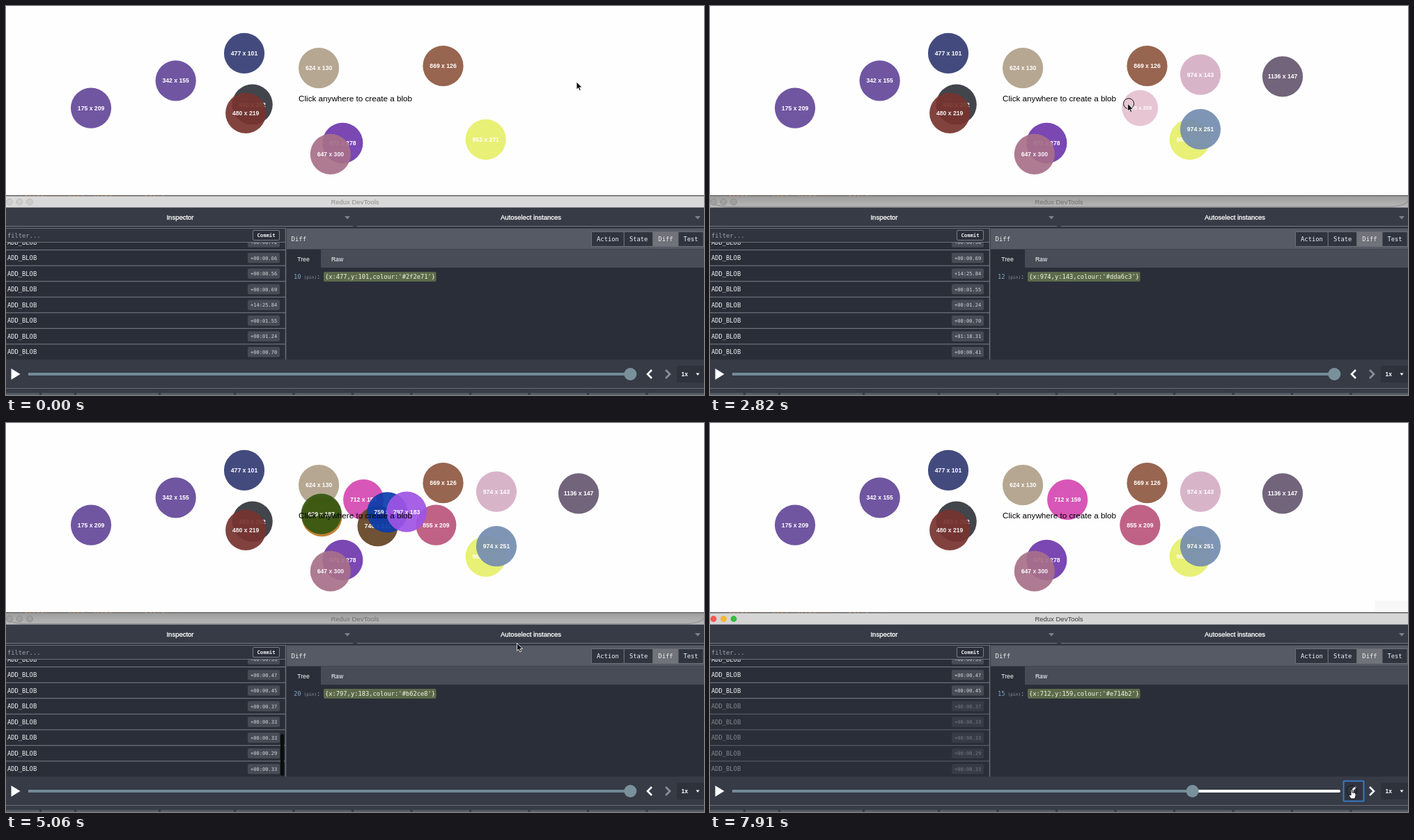
An HTML page that plays this animation: 1002 px wide and 559 px high, repeating every 8 s.

```html
<!DOCTYPE html>
<html lang="en">
<head>
<meta charset="utf-8">
<title>Blob time travel</title>
<style>
html, body { margin: 0; width: 100%; height: 100%; overflow: hidden; background: #fefefe; }
svg { display: block; width: 1002px; height: 559px; }
text { font-family: "Liberation Sans", Arial, sans-serif; white-space: pre; }
.mono { font-family: "DejaVu Sans Mono", monospace; font-size: 8.75px; fill: #f0f1f3; }
.head { font-size: 9.5px; fill: #fff; stroke: #fff; stroke-width: .3px; }
.mid { text-anchor: middle; }
.blob text { font-size: 8.65px; font-weight: bold; fill: #fff; text-anchor: middle; }
.chevron { fill: none; stroke: #fff; stroke-width: 2.6px; }
.dots circle { stroke-width: .8px; }
</style>
</head>
<body>
<svg viewBox="0 0 1002 559">
  <defs>
    <clipPath id="listClip"><rect y="340" width="401" height="168"/></clipPath>
    <clipPath id="codeClip"><rect y="271" width="262" height="3"/></clipPath>
    <linearGradient id="shade" x2="0" y2="1">
      <stop offset="0" stop-color="#9c9c9c"/><stop offset=".4" stop-color="#a9a9a9"/><stop offset="1" stop-color="#b9b9b9"/>
    </linearGradient>
  </defs>
  <rect width="1002" height="272" fill="#fefefe"/>
  <g id="blobs"></g>
  <text x="420" y="137" font-size="11.7">Click anywhere to create a blob</text>
  <rect id="patch" x="955" y="255" width="47" height="17" fill="#f8f8f8"/>

  <rect y="272" width="1002" height="1.500" fill="#444446"/>
  <rect id="bar" y="273.500" width="1002" height="16"/>
  <path id="corners" d="M0 280Q4 287 24 288.500H978Q998 287 1002 280" fill="none" stroke="#949494" stroke-width="1.500"/>
  <g clip-path="url(#codeClip)" opacity=".6">
    <text class="mono" x="8" y="273" style="fill:#c98a55;font-size:9.6px">( reducer, // apply logic());  [ store( )];</text>
  </g>
  <g class="dots" id="dots"></g>
  <text id="title" class="mid" x="501" y="285" font-size="9.5">Redux DevTools</text>

  <rect y="289.500" width="1002" height="269.500" fill="#363b46"/>
  <rect y="318" width="1002" height="190" fill="#2a2e38"/>
  <path d="M0 316.500H498M504 316.500H1002" stroke="#6f747e"/>
  <text class="head mid" x="250" y="307">Inspector</text>
  <text class="head mid" x="753.500" y="307">Autoselect instances</text>
  <path d="M486 302h8l-4 4.500zM989 302h8l-4 4.500z" fill="#7d838e"/>

  <rect y="319.500" width="401" height="20" fill="#2f343e"/>
  <path d="M0 319.500H401M0 339.500H401" stroke="#6b6f78"/>
  <text class="mono" x="2" y="332.500" style="fill:#a0a4ab">filter...</text>
  <rect x="354.500" y="322.500" width="38" height="14" rx="1.500" fill="#2a2e38" stroke="#7a7f88"/>
  <text class="mono mid" x="373.500" y="332.300" style="font-size:7.2px;font-weight:bold">Commit</text>
  <g id="list" clip-path="url(#listClip)"></g>
  <rect id="scroll" x="394" y="447" width="5" height="60" rx="2.500" fill="#0b0c0e"/>
  <path d="M401.500 319V508" stroke="#6b6f78" stroke-width="1.500"/>

  <rect x="403" y="319.500" width="599" height="30" fill="#565a64"/>
  <rect x="403" y="350" width="599" height="26" fill="#484c56"/>
  <rect x="403" y="350" width="49" height="26" fill="#2a2e38"/>
  <text class="mono" x="409.500" y="337.500" style="font-size:9px">Diff</text>
  <g id="buttons"></g>
  <text class="mid" x="427" y="367" font-size="8.6" fill="#fff">Tree</text>
  <text class="mid" x="475.500" y="367" font-size="8.6" fill="#fff">Raw</text>
  <text class="mono" id="pin" x="413" y="392" style="fill:#7fa6c6"></text>
  <text class="mono" x="427.500" y="392" style="font-size:6.2px;fill:#8f959e">(pin)</text>
  <text class="mono" x="446" y="392" style="fill:#9ab0c2">:</text>
  <rect x="456" y="382" width="161.500" height="14" rx="2" fill="#5c6a4a"/>
  <text class="mono" id="value" x="458" y="392" style="fill:#f2f4e4"></text>

  <path d="M7.500 521V537L20.500 529z" fill="#fff"/>
  <rect x="32" y="527" width="873" height="4" rx="2" fill="#fff"/>
  <rect id="fill" x="32" y="527" height="4" rx="2" fill="#738a95"/>
  <circle id="thumb" cy="529" r="9" fill="#7a919c"/>
  <rect id="focus" x="909.500" y="514.500" width="29" height="29" rx="1" fill="#2f343f" stroke="#3b78c4" stroke-width="2"/>
  <path class="chevron" d="M927 523L921 529L927 535"/>
  <path class="chevron" id="next" d="M947 523L953 529L947 535"/>
  <rect x="963" y="517" width="39" height="24" fill="#2d323c"/>
  <text x="969.500" y="532" font-size="8.4" font-weight="bold" fill="#fff">1x</text>
  <path d="M990.500 527.500h5l-2.500 3.500z" fill="#fff"/>
  <path d="M0 549.500H1002" stroke="#666b75"/>
  <g id="tabs" fill="#565b65"></g>

  <circle id="ring" r="7.500" fill="none" stroke="#151515"/>
  <g id="cursor">
    <path id="arrow" d="M0 0V11L2.500 8.700L4.300 12.600L6.200 11.700L4.500 8H8z" fill="#111" stroke="#fff" stroke-width=".8"/>
    <path id="beam" d="M-2 -5Q0 -5 0 -4Q0 -5 2 -5M0 -4V5M-2 6Q0 6 0 5Q0 6 2 6" fill="none" stroke="#222"/>
    <path id="hand" d="M-1 -3Q0 -4.500 1 -3V1Q6 1 6 3V6L4.500 10H-1L-4 5Q-4 3 -1 5z" fill="#fff" stroke="#111"/>
  </g>
</svg>
<script>
const LOOP = 8000;
const FIRST = 10;                     // blobs present at the start
const PACE = 940;                     // playback ms per logged second
const GROW = 400;
const REFOCUS = 600, LEAVE = 6090, PRESS = 6480;

const $ = id => document.getElementById(id);
const el = (parent, tag, attrs = {}, text = "") => {
  const node = document.createElementNS("http://www.w3.org/2000/svg", tag);
  set(node, attrs);
  node.textContent = text;
  return parent.appendChild(node);
};
const set = (node, attrs) => { for (const key in attrs) node.setAttribute(key, attrs[key]); };
const show = (node, on) => { node.style.display = on ? "" : "none"; };
const clamp = v => Math.min(1, Math.max(0, v));
const inOut = k => k < .5 ? 4 * k ** 3 : 1 - 4 * (1 - k) ** 3;
const outBack = k => 1 + 2 * (k - 1) ** 3 + (k - 1) ** 2;

// x, y, shown colour, logged delay, colour in the state
const blobs = `175 209 64489a 00:00.61
342 155 64489a 00:00.58
624 130 b0a089 00:00.72
493 202 33363c 00:00.66
480 219 78342f 00:00.56
869 126 8f5942 00:00.69
953 271 e7ef6b 14:25.84
671 278 6f38ad 00:01.55
647 300 a87089 00:01.24
477 101 343c74 00:00.70 2f2e71
1136 147 675870 01:18.31
974 143 d5aec5 00:00.41 dda6c3
974 251 748db0 00:00.35
855 209 ba557c 00:00.47
712 159 d548b2 00:00.45 e714b2
740 211 634423 00:00.37
630 192 bd7726 00:00.33
629 187 345711 00:00.33 2c6019
759 184 0b3dac 00:00.29 1534af
797 183 9f54e6 00:00.33 b62ce8`.split("\n").map(line => {
  const [x, y, colour, delay, hex = colour] = line.split(" ");
  return { x, y, colour, delay, hex, cx: x / 1.373 - 5.4, cy: y / 1.373 - 5.6 };
});

// Clicks follow the logged delays; undo steps then come at an even beat.
let clock = 1520;
blobs.forEach((b, i) => {
  if (i > FIRST) clock += parseFloat(b.delay.slice(3)) * PACE;
  b.born = i < FIRST ? -GROW : clock;
  b.gone = 6680 + (blobs.length - 1 - i) * 305;
  b.node = el($("blobs"), "g", { class: "blob" });
  el(b.node, "circle", { r: 29.1, fill: "#" + b.colour });
  el(b.node, "text", { y: 3 }, `${b.x} x ${b.y}`);
});
const added = blobs.slice(FIRST);

const path = [[0, 819, 109], [1190, 821, 108], [1440, 821, 101],
  ...added.map(b => [b.born, b.cx - 1, b.cy - .5]),
  [5500, 927, 546], [5850, 926, 533], [6300, 921, 530], [LOOP, 921, 530]];

const rows = Array.from({ length: 8 }, (_, i) => {
  const y = 339.4 + i * 22.55;
  const row = el($("list"), "g");
  const line = el($("list"), "path", { d: `M0 ${y + 11.2}H401`, stroke: "#7b8089" });
  show(line, i < 7);
  el(row, "text", { class: "mono", x: 2, y: y + 3.2 }, "ADD_BLOB");
  el(row, "rect", { x: 347, y: y - 7.3, width: 46, height: 14.6, rx: 2, fill: "#474b55" });
  const delay = el(row, "text", { class: "mono", x: 351, y: y + 2.7, style: "font-size:7.05px;fill:#d3d5d9" });
  return { row, delay, line };
});

let left = 840;
["Action", "State", "Diff", "Test"].forEach(name => {
  const width = name.length * 5.3 + 15;
  el($("buttons"), "rect", { x: left + .5, y: 324.5, width, height: 21,
    fill: name === "Diff" ? "#70737a" : "#2f343f", stroke: "#6b6f78" });
  el($("buttons"), "text", { class: "mono mid", x: left + .5 + width / 2, y: 337.7 }, name);
  left += width;
});

const edges = [-2, 49, 99, 220];
for (let x = 328; x <= 1004; x += 84.5) edges.push(x);
edges.slice(1).forEach((x, i) =>
  el($("tabs"), "rect", { x: edges[i] + 2, y: 556, width: x - edges[i] - 3, height: 5, rx: 1.5 }));

const dots = [5, 19.5, 34].map(cx => el($("dots"), "circle", { cx, cy: 281.5, r: 4.4 }));
const LOOKS = {
  idle: { bar: "#d9d9d9", text: "#8c8c8c", dots: Array(3).fill("#cdcdcd"), edge: "#b4b4b4" },
  behind: { bar: "url(#shade)", text: "#707070", dots: Array(3).fill("#a0a0a0"), edge: "#858585" },
  active: { bar: "#d5d5d5", text: "#3d3d3d", dots: ["#f25750", "#f3b72f", "#35bd3f"], edge: "none" }
};

function drawBlobs(t) {
  blobs.forEach(b => {
    const k = clamp((t - b.born) / GROW);
    show(b.node, k > 0 && t < b.gone);
    set(b.node, { transform: `translate(${b.cx} ${b.cy}) scale(${outBack(k)})`, opacity: .92 * k });
  });
}

function drawInspector(t) {
  // The log catches up in batches.
  const batch = 620, phase = 1590;
  const synced = phase + Math.floor((t - phase) / batch) * batch;
  const total = blobs.filter(b => b.born <= synced).length;
  const current = blobs.filter(b => b.born <= synced && t < b.gone).length;
  const fresh = added.some(b => b.born <= synced && b.born > synced - batch);
  show($("scroll"), fresh && t - synced < 600);

  rows.forEach(({ row, delay, line }, i) => {
    const n = total - 7 + i;
    delay.textContent = "+" + blobs[n - 1].delay;
    set(row, { opacity: n > current ? .45 : 1 });
    set(line, { opacity: n > current ? .65 : 1 });
  });
  const b = blobs[current - 1];
  $("pin").textContent = current;
  $("value").textContent = `{x:${b.x},y:${b.y},colour:'#${b.hex}'}`;

  const behind = total - current;
  const x = 896.3 - 40.75 * behind;
  set($("thumb"), { cx: x });
  set($("fill"), { width: (behind ? x : 905) - 32 });
  $("next").style.stroke = behind ? "#fff" : "#8d9198";
  show($("focus"), t >= PRESS);
}

function drawWindow(t) {
  const name = t < REFOCUS ? "idle" : t < LEAVE ? "behind" : "active";
  const look = LOOKS[name];
  set($("bar"), { fill: look.bar });
  set($("title"), { fill: look.text });
  dots.forEach((dot, i) => set(dot, { fill: look.dots[i], stroke: look.edge }));
  show($("corners"), name === "behind");
  show($("patch"), name === "active");
}

function drawPointer(t) {
  const i = path.findIndex(p => p[0] > t);
  const [t0, x0, y0] = path[i - 1], [t1, x1, y1] = path[i];
  const k = inOut((t - t0) / (t1 - t0));
  const x = x0 + (x1 - x0) * k, y = y0 + (y1 - y0) * k;
  const hand = t >= 6300;
  const beam = !hand && x > 420 && x < 583 && y > 125 && y < 141;
  set($("cursor"), { transform: `translate(${x} ${y})` });
  show($("hand"), hand);
  show($("beam"), beam);
  show($("arrow"), !hand && !beam);

  const pressed = added.some(b => t > b.born - 40 && t < b.born + 160)
    || t >= REFOCUS && t < 950 || t >= LEAVE && t < PRESS || t >= 7140;
  set($("ring"), { cx: x + (hand ? 0 : 1.5), cy: y - (hand ? 1.5 : 0) });
  show($("ring"), pressed);
}

const start = performance.now();
function frame() {
  const t = (performance.now() - start) % LOOP;
  [drawBlobs, drawInspector, drawWindow, drawPointer].forEach(draw => draw(t));
  requestAnimationFrame(frame);
}
frame();
</script>
</body>
</html>
```
